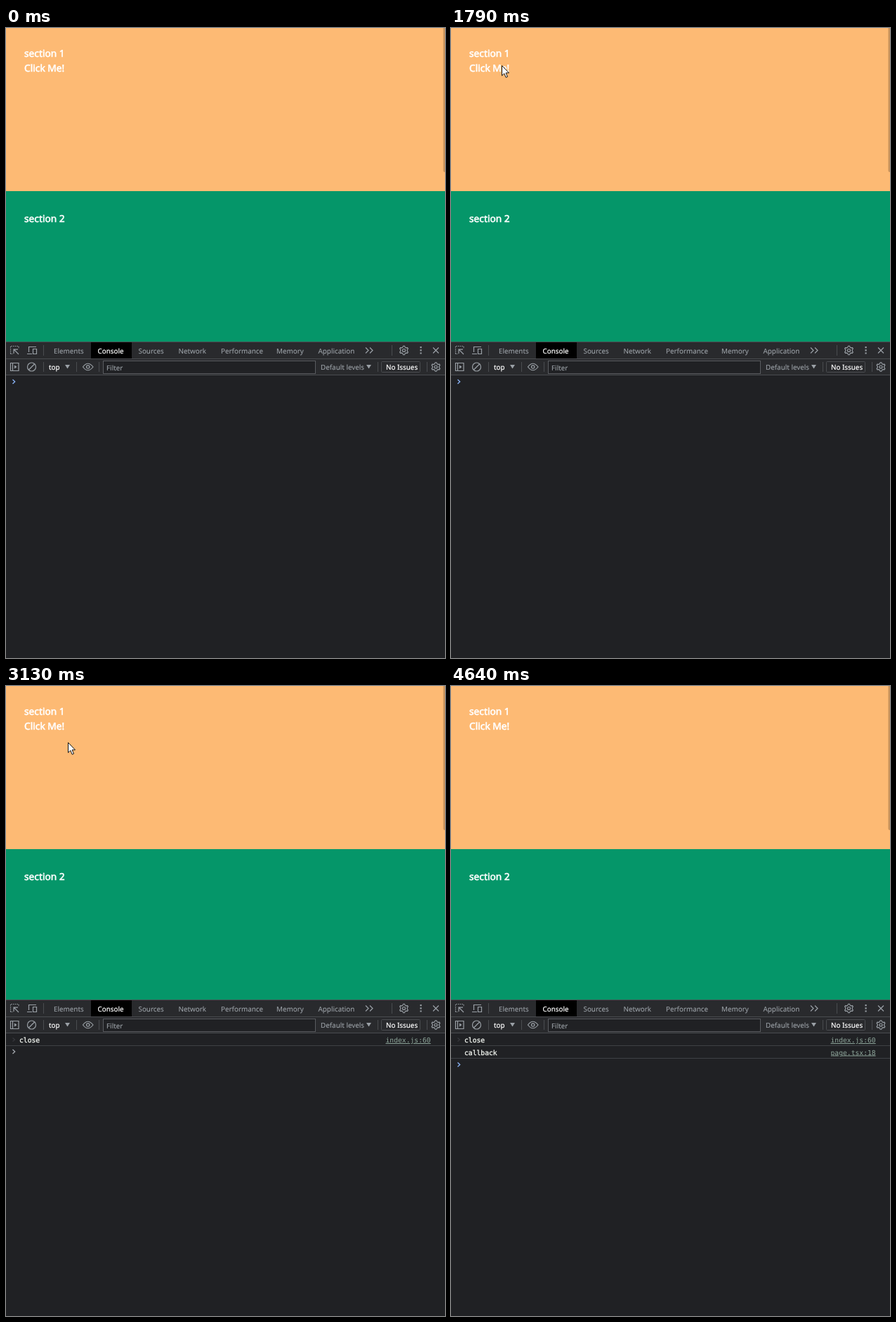
An HTML page for the animation above (5.23 s loop, 625 px wide and 896 px high).

```html
<!DOCTYPE html>
<html lang="en">
<head>
<meta charset="utf-8">
<title>Modal demo</title>
<style>
html, body { margin: 0; width: 100%; height: 100%; overflow: hidden; background: #202124; }
svg { display: block; width: 100%; height: 100%; }
text { text-rendering: geometricPrecision; white-space: pre; }
.page text { font: 13.75px "Noto Sans", sans-serif; stroke-width: .6px; }
.light { fill: #fff; stroke: #fff; }
.page .lorem text { fill: #000; stroke: #000; stroke-width: .25px; }
.tools text { font: 9.85px "Noto Sans", sans-serif; fill: #9aa0a6; stroke: #9aa0a6; stroke-width: .1px; }
.tools text.on { fill: #fff; stroke: #fff; stroke-width: .2px; }
.log text { font: 9.7px "DejaVu Sans Mono", monospace; fill: #f4f8f2; stroke: #f4f8f2; stroke-width: .3px; }
.log text.link { fill: #8fa79c; stroke: none; text-decoration: underline; }
.icon { fill: none; stroke: #9aa0a6; stroke-width: 1.2; }
.solid { fill: #9aa0a6; }
.rule { fill: none; stroke: #4a4c50; }
.chev { fill: none; stroke-width: 1.3; }
.cursor path { fill: #fff; stroke: #111; stroke-linejoin: round; }
</style>
</head>
<body>
<svg viewBox="0 0 625 896" preserveAspectRatio="none">
  <defs><clipPath id="box"><rect x="138.500" y="36" width="350.500" height="350"/></clipPath></defs>

  <g class="page">
    <rect width="625" height="232" fill="#fdba74"/>
    <rect y="232" width="625" height="214" fill="#059669"/>
    <text class="light" x="26" y="41">section 1</text>
    <text class="light" x="26" y="62">Click Me!</text>
    <text class="light" x="26" y="276">section 2</text>
    <path id="bar" d="M625 0H622.500V203Q622.500 205 625 205Z" fill="#c8935c"/>
    <g id="modal">
      <rect width="625" height="446" fill="#000" opacity=".8"/>
      <text class="light" x="274" y="30.500">Close Modal</text>
      <g clip-path="url(#box)">
        <rect x="138.500" y="36" width="350.500" height="350" fill="#9ca3af"/>
        <rect x="152.500" y="50" width="114" height="49" fill="#000"/>
        <text class="light" x="180.500" y="80">Click Me!</text>
        <g class="lorem" id="lorem"></g>
        <rect x="482" y="38" width="5" height="95" rx="2.500" fill="#6c7680"/>
      </g>
    </g>
  </g>

  <g class="tools">
    <rect y="446" width="625" height="450" fill="#202124"/>
    <rect y="446" width="625" height="47" fill="#292a2d"/>
    <rect x="121" y="447" width="58" height="23" fill="#000"/>
    <path class="rule" d="M0 446.500H625M0 470.500H625M0 493.500H625M53.500 451V466M549.500 451V466M53.500 475V489M100.500 475V489M132.500 475V489M529.500 475V489M599.500 475V489"/>
    <g id="tabs"></g>
    <text class="on" x="61" y="486">top</text>
    <path class="solid" d="M84 479h7l-3.500 5.500zM513 479h7l-3.500 5.500z"/>
    <rect x="138.500" y="473.500" width="302" height="18" fill="#202124" stroke="#5a5c60"/>
    <text x="143" y="487">Filter</text>
    <text x="448" y="486">Default levels</text>
    <rect class="rule" x="534.500" y="474.500" width="55" height="15" rx="1"/>
    <text class="on" x="541" y="486">No Issues</text>
    <g class="icon">
      <path d="M6.500 463V452.500H18V456" stroke-dasharray="1.500 1.300"/>
      <path d="M6.500 463.500H10" stroke-dasharray="1.500 1.300"/>
      <path d="M18 464L11.500 457.500M11 463V457.200H17"/>
      <path d="M32.500 461V453.500H43M30 463.500H37M38.500 456.500H43.500V463.500H38.500Z"/>
      <path d="M512 454.500L516 458.500L512 462.500M518 454.500L522 458.500L518 462.500"/>
      <path d="M608 454.500L616 462.500M616 454.500L608 462.500"/>
      <path d="M6.500 476.500H18V487.500H6.500ZM9.500 476.500V487.500"/>
      <path class="solid" d="M12 479.500L15.500 482L12 484.500Z" stroke="none"/>
      <circle cx="36.500" cy="482" r="6"/>
      <path d="M32.500 486L40.500 478"/>
      <path d="M109.500 482Q116.500 472.500 124 482Q116.500 491.500 109.500 482Z"/>
      <circle cx="116.700" cy="482" r="2.200"/>
      <path class="gear" data-x="566.500" data-y="458.500"/>
      <circle cx="566.500" cy="458.500" r="2"/>
      <path class="gear" data-x="612" data-y="482"/>
      <circle cx="612" cy="482" r="2"/>
    </g>
    <path class="solid" d="M589.500 453h2.200v2.200h-2.200zM589.500 457.200h2.200v2.200h-2.200zM589.500 461.400h2.200v2.200h-2.200z"/>
  </g>

  <g class="log">
    <g id="row1">
      <path class="chev" d="M9.500 500.500L12.500 503L9.500 505.500" stroke="#36383c"/>
      <text x="19" y="507">close</text>
      <text class="link" x="540.500" y="507">index.js:60</text>
      <path class="rule" d="M0 511.500H625" stroke-opacity=".75"/>
    </g>
    <g id="row2">
      <text x="19" y="524.500">callback</text>
      <text class="link" x="540.500" y="524.500">page.tsx:18</text>
      <path class="rule" d="M0 529.500H625" stroke-opacity=".75"/>
    </g>
    <path id="prompt" class="chev" d="M9.500 -3L12.700 0L9.500 3"/>
  </g>

  <g id="cursor" class="cursor">
    <path id="arrow" d="M.5 .5V14.800L3.800 11.700L6.200 17.300L8.500 16.300L6.100 10.900H10.500Z"/>
    <path id="hand" d="M-1.500 13V2Q-1.500 .500 0 .500T1.500 2V7.500Q3.200 6.300 4.500 8Q6.200 7.200 7.300 8.800Q10.300 8 10.300 11V15Q10 18 8.500 19.500V21.500H-.500V19.500Q-2 17.500 -4.500 13.500Q-5.200 11 -3 11.200Z"/>
  </g>
</svg>
<script>
const LOOP = 5230;
const $ = id => document.getElementById(id);
const show = (el, on) => el.setAttribute('display', on ? 'inline' : 'none');

function addText(parent, x, y, str, cls) {
  const el = document.createElementNS('http://www.w3.org/2000/svg', 'text');
  el.setAttribute('x', x);
  el.setAttribute('y', y);
  if (cls) el.setAttribute('class', cls);
  el.textContent = str;
  parent.appendChild(el);
}

[
  'Lorem ipsum dolor sit amet, consectetur',
  'adipiscing elit, sed do eiusmod tempor incididunt',
  'ut labore et dolore magna aliqua. Elementum',
  'sagittis vitae et leo duis. Non consectetur a erat',
  'nam. Sit amet consectetur adipiscing elit duis',
  'tristique sollicitudin nibh sit. Tellus in hac',
  'habitasse platea dictumst vestibulum. Vel turpis',
  'nunc eget lorem dolor sed viverra. Nisl rhoncus',
  'mattis rhoncus urna neque viverra justo. Viverra',
  'aliquet eget sit amet tellus cras adipiscing enim.',
  'Pharetra diam sit amet nisl suscipit adipiscing',
  'bibendum. In hac habitasse platea dictumst',
  'vestibulum rhoncus. Ante in nibh mauris cursus',
  'mattis molestie a iaculis at. Sed lectus vestibulum'
].forEach((line, i) => addText($('lorem'), 152.5, 114.4 + 21.03 * i, line));

Object.entries({
  Elements: 68, Console: 130.5, Sources: 188.5, Network: 245.5,
  Performance: 306, Memory: 385, Application: 444.5
}).forEach(([name, x]) => addText($('tabs'), x, 462.5, name, name === 'Console' ? 'on' : ''));

document.querySelectorAll('.gear').forEach(el => {
  const { x, y } = el.dataset;
  const pts = [];
  for (let i = 0; i < 24; i++) {
    const r = i % 4 < 2 ? 6.3 : 4.7;
    const a = (i - 0.5) * Math.PI / 12 + Math.PI / 6;
    pts.push((+x + r * Math.cos(a)).toFixed(2) + ' ' + (+y + r * Math.sin(a)).toFixed(2));
  }
  el.setAttribute('d', 'M' + pts.join('L') + 'Z');
});

// Pointer tracks: time, x, y
const tracks = [
  [[50, 596, 880], [200, 472, 420], [290, 415, 300], [400, 315, 145], [510, 245, 49],
   [595, 245, 49], [650, 186, -20]],
  [[930, 85, -14], [1150, 78, 25], [1300, 73, 46], [1420, 72, 52], [1490, 72, 52], [1510, 72, 53],
   [2120, 72, 53], [2350, 80, 68], [2640, 87, 78], [2750, 87, 78], [2770, 88, 80],
   [3710, 88, 80], [3820, 112, 128], [4010, 273, 438], [4110, 339, 609], [4240, 447, 755],
   [4400, 510, 828], [4640, 577, 897]]
];

// The pointer moves in steps of 20 ms
const step = t => Math.floor((t - 10) / 20) * 20 + 10;

function pointer(t) {
  for (const track of tracks) {
    if (t < track[0][0] || t >= track[track.length - 1][0]) continue;
    const s = step(t);
    const i = track.findIndex(k => k[0] > s);
    const [t0, x0, y0] = track[i - 1], [t1, x1, y1] = track[i];
    const p = (s - t0) / (t1 - t0);
    return [Math.round(x0 + (x1 - x0) * p), Math.round(y0 + (y1 - y0) * p)];
  }
  return null;
}

function draw(t) {
  const open = t >= 1890 && t < 3060;
  const rows = t < 3130 ? 0 : t < 3190 ? 1 : 2;
  show($('modal'), open);
  show($('bar'), !open);
  show($('row1'), rows > 0);
  show($('row2'), rows > 1);
  $('prompt').setAttribute('transform', `translate(0 ${[503, 520, 538.5][rows]})`);
  $('prompt').setAttribute('stroke', rows === 1 ? '#a3a8ae' : '#8ab4f8');

  const pos = pointer(t);
  show($('cursor'), pos);
  if (!pos) return;
  const [x, y] = pos;
  const link = t < 1740 && x > 26 && x < 84 && y > 46 && y < 67;
  show($('hand'), link);
  show($('arrow'), !link);
  $('cursor').setAttribute('transform', `translate(${x} ${y})`);
}

const start = performance.now();
function tick() {
  draw((performance.now() - start) % LOOP);
  requestAnimationFrame(tick);
}
draw(0);
requestAnimationFrame(tick);
</script>
</body>
</html>
```
